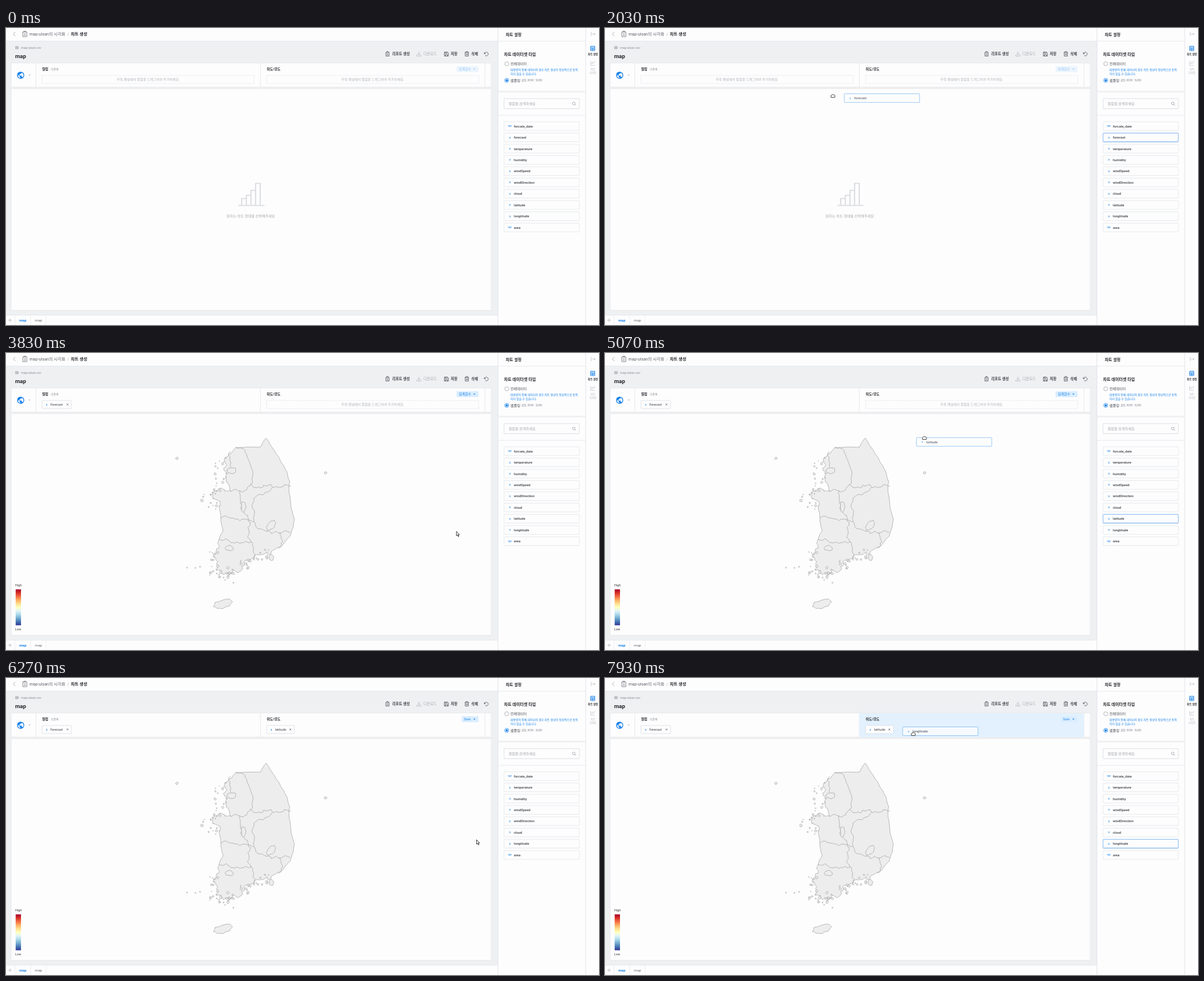
Write an HTML page that moves like this. It is 1024 px wide and 513 px high and loops after 8000 ms.

```html
<!DOCTYPE html>
<html lang="ko">
<head>
<meta charset="utf-8">
<style>
html, body { margin: 0; width: 100%; height: 100%; overflow: hidden; background: #eff0f2; }
svg { display: block; width: 100vw; height: 100vh; }
text { font-family: Roboto, 'Noto Sans CJK KR', 'Noto Sans CJK', sans-serif; white-space: pre; }
</style>
</head>
<body>
<svg viewBox="0 0 1024 513">
  <g id="frame"></g>
  <g id="placeholder"></g>
  <g id="map" stroke="#8f8f91" stroke-width=".6" stroke-linejoin="round"></g>
  <g id="live"></g>
</svg>
<script>
const LOOP = 8000;
const PAPER = '#fdfdfe', LINE = '#e3e4e7', INK = '#26272b', SOFT = '#3c3e44', GRAY = '#a6a8ad';
const BLUE = '#1580e8', PALE = '#e3f1fe', LAND = '#ededee';
const HINT = '우측 패널에서 컬럼을 드래그하여 추가하세요.';
const COLUMNS = ['forcate_date', 'forecast', 'temperature', 'humidity', 'windSpeed', 'windDirection', 'cloud', 'latitude', 'longtitude', 'area'];
const $ = id => document.getElementById(id);
const rowTop = i => 162 + 19.45 * i;

const text = (x, y, size, value, fill = INK, weight = 400, anchor = 'start') =>
  `<text x="${x}" y="${y}" font-size="${size}" fill="${fill}" font-weight="${weight}" text-anchor="${anchor}">${value}</text>`;
const rect = (x, y, w, h, fill, stroke = 'none', extra = '') =>
  `<rect x="${x}" y="${y}" width="${w}" height="${h}" fill="${fill}" stroke="${stroke}" stroke-width=".7" ${extra}/>`;
const path = (d, stroke, width = .8, fill = 'none') =>
  `<path d="${d}" fill="${fill}" stroke="${stroke}" stroke-width="${width}"/>`;
const circle = (x, y, r, fill, stroke = 'none') =>
  `<circle cx="${x}" cy="${y}" r="${r}" fill="${fill}" stroke="${stroke}" stroke-width=".8"/>`;
const at = (x, y, content) => `<g transform="translate(${x} ${y})">${content}</g>`;
const caret = (x, y, fill) => at(x, y, path('M-1.8 0h3.600l-1.800 2z', 'none', 0, fill));

function drawFrame() {
  const radio = (y, on) => circle(864.7, y, 3.5, PAPER, on ? BLUE : '#a2a4aa') + (on ? circle(864.7, y, 2, BLUE) : '');
  const tools = [
    [655, 667, '리포트 생성', 'M1 2h5.500v6.500H1zM2.500 2V.8H5V2M2.500 4.500H5M2.500 6.500H5'],
    [709, 721, '다운로드', 'M4 1v5.500M1.500 4L4 6.500 6.500 4M.5 6v2.500h7V6'],
    [756.5, 768, '저장', 'M.5 1.500H6L7.500 3v5.500h-7zM2 1.500V4h3V1.500M2 8.500V6h4v2.500'],
    [792, 803.5, '삭제', 'M0 2.300h7.500M2 2V.8h3.500V2M1 2.500v6h5.500v-6M3 4v3M4.700 4v3']
  ].map(([x, labelX, label, icon]) => {
    const off = label === '다운로드';
    return at(x, 40, path(icon, off ? '#b4b6bb' : '#4a4c52')) + text(labelX, 47, 6.25, label, off ? GRAY : SOFT, off ? 400 : 700);
  });

  $('frame').innerHTML = [
    rect(0, 0, 1024, 513, '#eff0f2'),
    // header
    rect(0, 0, 849, 22.5, PAPER), path('M0 22.700H849', LINE),
    path('M16 7l-3.300 3.500L16 14', '#9a9ca2'),
    path('M29 7h7v8h-7zM30.700 7V5.500h3.600V7M31 10h3M31 12.500h3', '#77797f', .9),
    text(40.5, 13, 7.2, 'map-ulsan의 시각화', '#5f6167'), text(106, 13, 7, '/', GRAY),
    text(112, 13, 7.2, '차트 생성', INK, 700),
    // title and tools
    path('M16.500 31.800h4.800V36h-4.800zM16.500 33.200h4.800M16.500 34.600h4.800M18.900 32v4', '#96989e', .6),
    text(26, 35.9, 5.4, 'map-ulsan.csv', '#8b8d93'),
    text(15.7, 51.7, 9.7, 'map', INK, 700), ...tools,
    path('M826 42v2.500h2.500M826.300 44.300a3.200 3.200 0 1 1 1.200 3.200', '#4a4c52'),
    // chart card
    rect(9, 60.5, 829, 427, PAPER, '#e4e5e8'),
    rect(9, 102, 829, 2.7, '#eff0f2'), path('M9 102H838M9 104.700H838', '#dfe0e3', .6),
    path('M51.500 61V102M439.300 61V102M827 61V102', LINE),
    at(25.3, 81.6, circle(0, 0, 6.2, BLUE) +
      path('M-4.800-1l3 3L-.6 3.700V4.900Q-5 4-4.800-1zM-2.500-1.200H-.6V-3H1.800V-4.600Q7-1 3.700 3.300L1.800 2.500V.6H-2.500z', 'none', 0, PAPER)),
    caret(40.8, 80.5, '#b5b7bc'),
    // sheet tabs
    rect(0, 496, 849, 17, PAPER), path('M0 496H849', LINE),
    path('M4 504.700h6M7 501.700v6', '#a9abb0', .7), path('M15.500 496v17M42.500 496v17M69 496v17', '#e8e9eb', .7),
    text(23, 506.8, 6.2, 'map', BLUE, 700), text(50, 506.8, 6.2, 'map', '#66686e'),
    // settings panel
    rect(849.5, 0, 174.5, 513, PAPER), path('M849.500 0V513M1001 0V513', '#dcdde1'),
    path('M850 22.700H1001M850 151H1001', LINE),
    text(863, 14.4, 6.9, '차트 설정', INK, 700),
    text(860, 48, 7, '차트 데이터셋 타입', INK, 700),
    radio(61.8, false), text(871, 64, 6.1, '전체데이터', '#4c4e54'),
    text(871, 73.7, 4.9, '대용량의 전체 데이터의 경우 차트 생성이 정상적으로 동작', BLUE),
    text(871, 80.8, 4.9, '하지 않을 수 있습니다.', BLUE),
    radio(90.4, true), text(871, 92.6, 6.2, '샘플링', SOFT), text(890, 92.2, 4.7, '권장, ROW : 5,000', '#84868c'),
    rect(850, 108.5, 151, 2.7, '#eff0f2'),
    rect(860, 122, 130, 17.3, PAPER, '#cfd1d5', 'rx="1"'),
    text(868, 132.9, 6.1, '컬럼을 검색하세요.', '#a0a2a8'),
    circle(980.5, 130.3, 2.3, 'none', '#9b9da3'), path('M982.200 132l2 2', '#9b9da3'),
    // icon rail
    path('M1010.500 7v7M1012 10.500h5.500m-2-2l2 2-2 2', '#b4b6bb', .7),
    path('M1009.700 31.500h7V39h-7zM1009.700 34h7M1013.200 34v5M1009.700 36.500h7', BLUE, 1),
    path('M1009.700 57v7.500h7M1011.500 62v-2.500M1013.500 62v-4M1015.500 61l1.500-4', '#c1c3c8'),
    text(1013.5, 46.5, 4.4, '차트 설정', INK, 700, 'middle'),
    text(1013.5, 72.6, 4.4, '차트', '#b0b2b7', 400, 'middle'),
    text(1013.5, 79, 4.4, '디자인', '#b0b2b7', 400, 'middle')
  ].join('');

  const bars = [12, 17.5, 26, 38].map((h, i) => `M${407 + 8 * i} 306.500v${-h}h8v${h}`).join('');
  $('placeholder').innerHTML = path(bars + 'M401 306.500H446.500', '#dedfe2', 2.2) +
    text(423.5, 327.3, 6.15, '원하는 차트 형태를 선택해주세요.', GRAY, 400, 'middle');
}

// Map: a few key points, roughened by seeded midpoint displacement.
const COAST = '449,147 461,165 480,195 490,222 492,262 498,287 491,316 475,334 449,345 428,357 412,364 394,375 376,383 362,374 358,348 368,322 375,306 371,285 368,266 356,248 370,234 388,239 379,216 379,190 397,163 440,162';
const BORDERS = [
  '397,163 416,178 424,200 422,227 404,238 388,239',
  '388,170 388,197',
  '422,227 445,228 470,232 492,230',
  '404,238 405,255 413,278 422,293 420,310 424,326 428,355',
  '460,232 438,244 427,270 428,291 440,304 458,312 491,310',
  '371,286 392,285 416,288 428,291',
  '368,322 386,325 410,328 424,326',
  '472,310 478,325 470,338'
];
const points = s => s.split(' ').map(p => p.split(',').map(Number));
const isRagged = ([x, y]) => y > 335 || (x < 386 && y < 270);
let seed = 11;
const random = () => (seed = seed * 16807 % 2147483647) / 2147483647;
const spread = size => (random() - .5) * size;

function roughPath(list, closed, amountAt, levels) {
  let pts = closed ? [...list, list[0]] : list;
  for (let k = 0; k < levels; k++) {
    pts = pts.flatMap((p, i) => {
      const q = pts[i + 1];
      if (!q) return [p];
      const shift = spread(amountAt(p)), dx = q[0] - p[0], dy = q[1] - p[1];
      return [p, [(p[0] + q[0]) / 2 - dy * shift, (p[1] + q[1]) / 2 + dx * shift]];
    });
  }
  return 'M' + pts.map(p => p.map(v => v.toFixed(1))).join('L') + (closed ? 'Z' : '');
}

function blob(x, y, rx, ry = rx, tilt = 0) {
  const ring = Array.from({ length: 8 }, (_, i) => {
    const a = i * Math.PI / 4, r = 1 + spread(.35), dx = r * rx * Math.cos(a);
    return [x + dx, y + r * ry * Math.sin(a) - tilt * dx];
  });
  return `<path d="${roughPath(ring, true, () => .3, 1)}" fill="${LAND}"/>`;
}

function drawMap() {
  const coast = points(COAST);
  const borders = BORDERS.map(b => roughPath(points(b), false, () => .5, 3)).join('');
  let out = `<path d="${roughPath(coast, true, p => isRagged(p) ? .7 : .12, 3)}" fill="${LAND}"/>` +
    `<path d="${borders}" fill="none"/>` +
    blob(390, 203, 8, 5) + blob(410, 265, 4, 9) + blob(457, 298, 8, 7, .5) + blob(385, 337, 7, 5) +
    blob(374, 434, 16, 8, .25) + blob(458, 353, 4, 6) + blob(295, 182, 2.5, 1.8) + blob(552, 207, 2.5, 2);

  // Islets hug the ragged shores; a few lie farther out.
  coast.filter(isRagged).forEach(([x, y]) => {
    const south = y > 335;
    for (let k = 0; k < 7; k++)
      out += blob(x + spread(20) - (south ? 2 : 8), y + spread(18) + (south ? 3 : 0), .5 + 2 * random() ** 2);
  });
  for (let k = 0; k < 7; k++) out += blob(312 + 13 * k + spread(8), 362 + 6 * k + spread(20), 1);

  const scale = ['#a50026', '#d73027', '#f46d43', '#fdae61', '#fee090', '#ffffbf', '#e0f3f8', '#abd9e9', '#74add1', '#4575b4', '#313695'];
  const stops = scale.map((c, i) => `<stop offset="${i / 10}" stop-color="${c}"/>`).join('');
  out += `<linearGradient id="heat" x2="0" y2="1">${stops}</linearGradient><g stroke="none">` +
    rect(16.7, 408.3, 9.2, 62, 'url(#heat)') +
    text(15.7, 403.2, 5.6, 'High', '#3c3c3c') + text(15.7, 479.2, 5.6, 'Low', '#3c3c3c') + '</g>';
  $('map').innerHTML = out;
}

// Each drag: reach for a row, carry it to a drop point. Sag bends the pointer's path vertically.
const ENTRY = { time: 500, point: [1016, 130] };
const DRAGS = [
  { name: 'forecast', row: 1, grip: [22, 9], reach: [500, 900], reachSag: 0, carry: [1853, 2266], carrySag: -8, drop: [160, 93], release: 2960, done: 3110 },
  { name: 'latitude', row: 6, grip: [20, 5], reach: [3250, 4182], reachSag: 106, carry: [4420, 5540], carrySag: 34, drop: [482, 94], release: 5600, done: 5730 },
  { name: 'longtitude', row: 6, grip: [18.5, 12.5], reach: [5976, 6474], reachSag: 38, carry: [7070, 7750], carrySag: 0, drop: [532.5, 97], release: LOOP, done: LOOP }
];

function glide(from, to, [begin, end], sag, t) {
  const u = Math.min(1, Math.max(0, (t - begin) / (end - begin)));
  const s = 1 - (1 - u) ** 2;
  return [from[0] + (to[0] - from[0]) * s, from[1] + (to[1] - from[1]) * s + sag * 4 * s * (1 - s)];
}

const pointerAt = t => DRAGS.reduce((p, d) => {
  const pick = [860 + d.grip[0], rowTop(d.row) + d.grip[1]];
  return glide(glide(p, pick, d.reach, d.reachSag, t), d.drop, d.carry, d.carrySag, t);
}, ENTRY.point);

function item(name, x, y, border) {
  const isText = name === 'forcate_date' || name === 'area';
  const dots = border ? [0, 2, 4].map(d => circle(x + 121, y + 5.5 + d, .35, '#d3d5d9')).join('') : '';
  return rect(x, y, 130, 15, PAPER, border || '#dfe0e3', 'rx="1"') +
    text(x + 10, y + 9.1, isText ? 3.4 : 4.4, isText ? 'TXT' : '3', BLUE, 700, 'middle') +
    text(x + 17, y + 9.6, 5.8, name, SOFT, 500) + dots;
}

const chip = (x, w, name) => rect(x, 82, w, 14, PAPER, '#d5d7db', 'rx="1"') +
  text(x + 8, 90.7, 4.4, '3', BLUE, 700, 'middle') + text(x + 14.5, 91, 5.8, name, SOFT) +
  path(`M${x + w - 8.3} 87.500l2.800 2.800m0-2.800l-2.800 2.800`, '#55575d');

function zone(x, w, hot, label, field) {
  const slot = field || rect(x + 10.7, 82, 366.3, 14, hot ? '#d5eaff' : PAPER, hot ? '#59aef5' : '#d9dbdf', hot ? '' : 'stroke-dasharray="1 .6"') +
    text(x + 194, 90.8, 5.8, HINT, hot ? BLUE : '#b0b2b7', 400, 'middle');
  return (hot ? rect(x, 61, w, 41, PALE) : '') + text(x + 10.7, 73.2, 5.9, label, INK, 700) + slot;
}

function aggregate(placed) {
  const [x, label] = placed === 2 ? [787, 'Sum'] : [778, '집계함수'];
  return `<g opacity="${placed ? 1 : .45}">` + rect(x, 66, 816 - x, 10.3, '#daedff', 'none', 'rx="1"') +
    text(x + 4, 73.2, 5.7, label, BLUE) + caret(808.8, 70.3, BLUE) + '</g>';
}

const ARROW = 'M0 0V7.500L1.700 6L3 8.800L4.200 8.200L2.900 5.500H5.200Z';
const FIST = 'M-3.300 2.400C-4-.2-3.500-1.700-2.300-1.400C-2-2.800-.6-2.800 0-2.200C.8-2.800 1.800-2.500 2.100-1.600C3.500-1.600 3.700.3 2.900 2.400Z';

function render(t) {
  const placed = DRAGS.filter(d => t >= d.done).length;
  const drag = DRAGS[placed];
  const carried = t >= drag.carry[0];
  const dragging = carried && t < drag.release;
  const taken = DRAGS.slice(0, placed).map(d => d.name);
  const p = pointerAt(t);
  const inZone = carried && p[1] < 102;
  $('placeholder').style.display = placed ? 'none' : '';
  $('map').style.display = placed ? '' : 'none';

  let out = zone(51.5, 387.8, inZone && p[0] < 439, '컬럼', placed && chip(62.2, 51, 'forecast')) +
    text(77, 73.1, 5.1, '기준축', '#8b8d93') +
    zone(439.3, 387.7, inZone && p[0] >= 439, '위도/경도', placed > 1 && chip(450, 48, 'latitude')) +
    aggregate(placed);
  COLUMNS.filter(c => !taken.includes(c)).forEach((c, i) => {
    const picked = c === drag.name && t >= drag.reach[1] - 30;
    if (picked) out += rect(860, rowTop(i) + 2, 130, 14.5, '#e3e9f1', 'none', 'rx="1"');
    out += item(c, 860, rowTop(i), picked && '#4a97ea');
  });
  if (dragging) {
    const late = pointerAt(Math.max(drag.carry[0], t - 20));
    out += `<g opacity=".75">${item(drag.name, late[0] - drag.grip[0], late[1] - drag.grip[1], '#3d9be9')}</g>`;
  }
  if (t >= ENTRY.time) out += at(...p, path(dragging ? FIST : ARROW, '#222', .9, '#fff'));
  $('live').innerHTML = out;
}

drawFrame();
drawMap();
const start = performance.now();
(function tick() {
  render((performance.now() - start) % LOOP);
  requestAnimationFrame(tick);
})();
</script>
</body>
</html>
```
